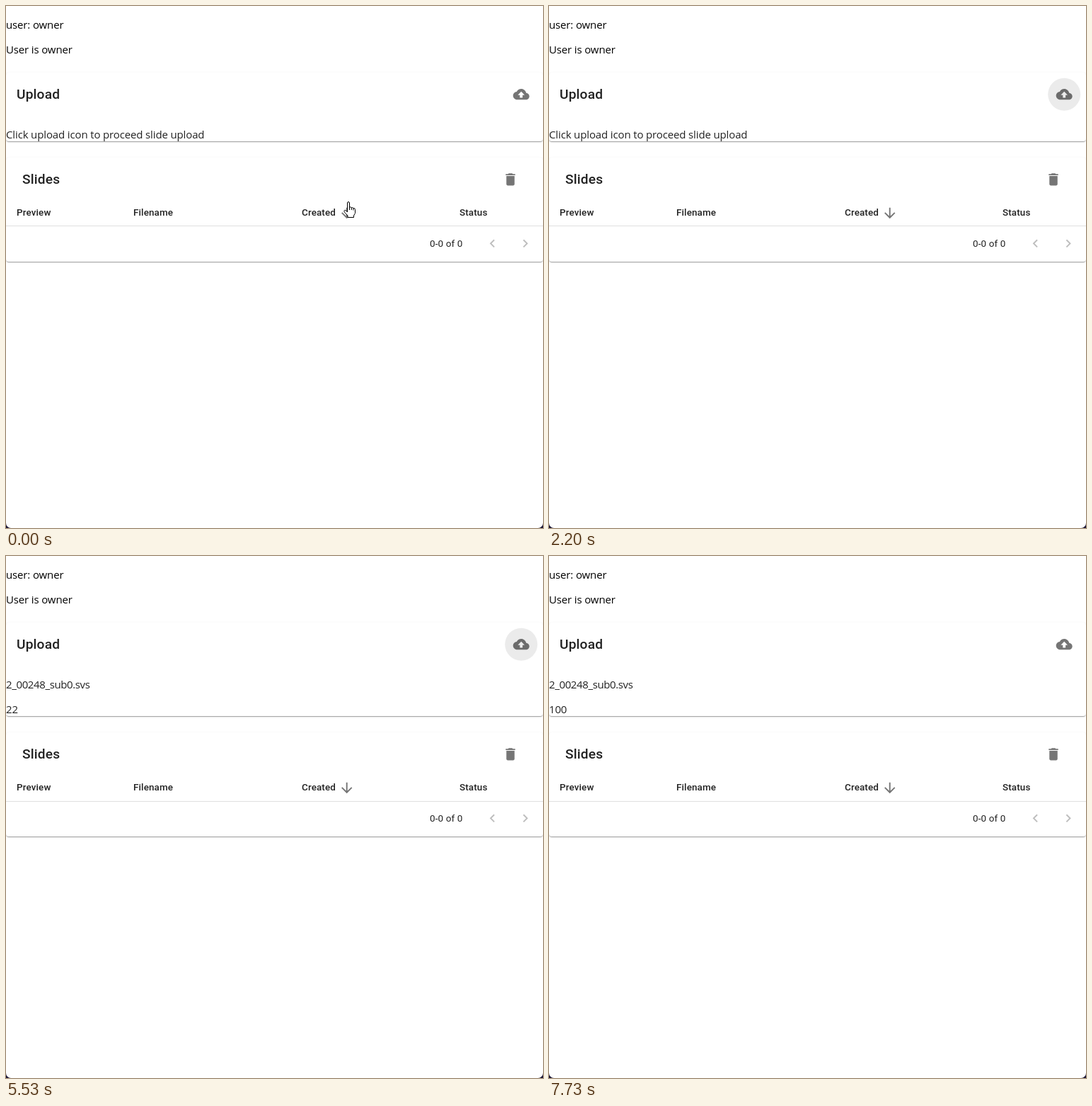
These frames come from a looping animation (759 by 737 pixels, 8000 ms). An HTML page:

```html
<!DOCTYPE html>
<html lang="en">
<head>
<meta charset="utf-8">
<title>Slide upload</title>
<style>
html, body { margin: 0; width: 100%; height: 100%; overflow: hidden; background: #1a1433; }
#stage { position: absolute; left: 0; top: 0; width: 759px; height: 737px; overflow: hidden; background: #fff; border-radius: 0 0 7px 7px; }
.card {
  position: absolute; left: 0; width: 759px; background: #fff; border-radius: 4px;
  box-shadow: 0 1.9px 1px -1px rgba(0,0,0,.2), 0 1px 1px rgba(0,0,0,.14), 0 1px 2.9px rgba(0,0,0,.12);
}
#upload { top: 94px; height: 97px; }
#slides { top: 213.9px; height: 147px; }
#slides i { position: absolute; left: 0; right: 0; top: 96.4px; height: 1px; background: #e0e0e0; }
svg { position: absolute; left: 0; top: 0; }
text { fill: rgba(0,0,0,.87); white-space: pre; }
.body { font: 15px "Open Sans", "Noto Sans", sans-serif; letter-spacing: -.14px; }
.file { letter-spacing: -.4px; }
.top { fill: #000; }
.title { font: 500 19.17px Roboto, sans-serif; letter-spacing: .0075em; }
.head { font: 500 13.42px Roboto, sans-serif; letter-spacing: .0107em; }
.page { font: 400 13.42px Roboto, sans-serif; letter-spacing: .0107em; }
.tip { font: 500 9.75px Roboto, sans-serif; fill: #fff; text-anchor: middle; }
.icon { fill: #000; fill-opacity: .54; }
.off { fill-opacity: .26; }
.pointer { fill: #fff; stroke: #000; stroke-width: 1; stroke-linejoin: round; }
</style>
</head>
<body>
<div id="stage">
  <div class="card" id="upload"></div>
  <div class="card" id="slides"><i></i></div>
  <svg width="759" height="737" viewBox="0 0 759 737">
    <text class="body top" x="0" y="32">user: owner</text>
    <text class="body top" x="0" y="67">User is owner</text>

    <text class="title" x="15" y="131">Upload</text>
    <circle id="halo" cx="728.2" cy="124.7" r="23" fill="#ebebeb"/>
    <path class="icon" transform="translate(716.7 113.2) scale(.9583)" d="M19.35 10.04C18.67 6.59 15.64 4 12 4 9.11 4 6.6 5.64 5.35 8.04 2.34 8.36 0 10.91 0 14c0 3.31 2.69 6 6 6h13c2.76 0 5-2.24 5-5 0-2.64-2.05-4.78-4.65-4.96zM14 13v4h-4v-4H7l5-5 5 5h-3z"/>
    <text class="body" id="hint" x="0" y="187">Click upload icon to proceed slide upload</text>
    <g id="progress">
      <text class="body file" x="0" y="187">2_00248_sub0.svs</text>
      <text class="body" id="count" x="0" y="222">0</text>
    </g>

    <g id="table">
      <text class="title" x="23" y="251">Slides</text>
      <path class="icon" transform="translate(701.5 233.3) scale(.9583)" d="M6 19c0 1.1.9 2 2 2h8c1.1 0 2-.9 2-2V7H6v12zM19 4h-3.5l-1-1h-5l-1 1H5v2h14V4z"/>
      <text class="head" x="15" y="296">Preview</text>
      <text class="head" x="180" y="296">Filename</text>
      <text class="head" x="418" y="296">Created</text>
      <text class="head" x="641" y="296">Status</text>
      <path class="icon" transform="translate(470.2 281) scale(.9583)" d="M20 12l-1.41-1.41L13 16.17V4h-2v12.17l-5.58-5.59L4 12l8 8 8-8z"/>
      <text class="page" x="599" y="340">0-0 of 0</text>
      <path class="icon off" transform="translate(676 323.8) scale(.9583)" d="M15.41 7.41L14 6l-6 6 6 6 1.41-1.41L10.83 12z"/>
      <path class="icon off" transform="translate(722.5 323.8) scale(.9583)" d="M10 6L8.59 7.41 13.17 12l-4.58 4.59L10 18l6-6z"/>
    </g>

    <g id="tooltip">
      <rect x="686" y="161" width="68" height="21" rx="4" fill="#6e6e6e"/>
      <text class="tip" x="720" y="175">Upload slide</text>
    </g>

    <path class="pointer" id="arrow" d="M.5 .5V16.5L4.3 13 6.8 18.7 9.2 17.7 6.7 12H11z"/>
    <path class="pointer" id="hand" d="M6 22.5V20L1.5 15.2Q.2 13.2 1.5 12.4Q2.8 12 4 13.4L5.5 15V2Q5.7.5 7 .5T8.5 2V8.2Q10 7 11.3 8.8Q13 7.8 14 9.6Q16.3 9 16.5 11.4V16.5L14.5 20V22.5zM8.5 8V12M11.3 8.8V12M14 9.6V12.5"/>
    <g id="busy">
      <circle r="5.2" fill="#fff" stroke="#2f8fd3" stroke-width="3.8"/>
      <path d="M0 -5.2A5.2 5.2 0 0 1 5.2 0" fill="none" stroke="#5db1e8" stroke-width="2.6"/>
    </g>
  </svg>
</div>
<script>
const LOOP = 8000;
const LISTED = 5070;
const ROW = 35.4;

// Held pointer poses: start time, kind, x, y
const pointerSteps = [
  [0, "hand", 477, 276], [70],
  [1400, "arrow", 560, 700], [1470, "arrow", 672, 330], [1530, "arrow", 728, 150],
  [1600, "hand", 728, 119], [1670, "hand", 728, 119],
  [1730, "busy", 734, 119], [2200],
  [5600, "arrow", 747, 117], [5670, "arrow", 748, 150], [5730, "arrow", 748, 186],
  [5800, "arrow", 744, 210], [5870, "arrow", 739, 208], [5930, "arrow", 737, 206], [7730]
];

// Opacity keys: time, value
const haloKeys = [[1530, 0], [1670, 1], [5700, 1], [5900, 0]];
const tooltipKeys = [[1540, 0], [1710, 1], [1930, 1], [2130, 0]];

// Two ticks every 200 ms; the last one comes late
const ticks = [5130];
for (let t = 5270; t < 7200; t += 200) ticks.push(t, t + 60);
ticks.push(7270, 7400);

const el = id => document.getElementById(id);
const show = (id, on) => { el(id).style.display = on ? "" : "none"; };
const place = (id, x, y, turn = 0) =>
  el(id).setAttribute("transform", `translate(${x} ${y}) rotate(${turn})`);

function ramp(keys, t) {
  if (t <= keys[0][0]) return keys[0][1];
  for (let i = 1; i < keys.length; i++) {
    const [t0, a] = keys[i - 1], [t1, b] = keys[i];
    if (t < t1) return a + (b - a) * (t - t0) / (t1 - t0);
  }
  return keys[keys.length - 1][1];
}

function drawPointer(t) {
  const [, kind, x, y] = pointerSteps.filter(s => s[0] <= t).pop();
  show("hand", kind === "hand");
  show("arrow", kind === "arrow" || kind === "busy");
  show("busy", kind === "busy");
  if (!kind) return;
  place(kind === "hand" ? "hand" : "arrow", x, y);
  if (kind === "busy") place("busy", x + 13, y + .5, t * .36);
}

function draw(t) {
  const listed = t >= LISTED;
  const shift = listed ? ROW : 0;
  show("hint", !listed);
  show("progress", listed);
  el("upload").style.height = 97 + shift + "px";
  el("slides").style.top = 213.9 + shift + "px";
  place("table", 0, Math.round(shift)); // whole pixels keep the text crisp

  const done = ticks.filter(at => at <= t).length;
  el("count").textContent = Math.min(100, Math.round(done * 100 / 22.5));

  el("halo").style.opacity = ramp(haloKeys, t);
  el("tooltip").style.opacity = ramp(tooltipKeys, t);
  drawPointer(t);
}

const start = performance.now();
function frame() {
  draw((performance.now() - start) % LOOP);
  requestAnimationFrame(frame);
}
frame();
</script>
</body>
</html>
```
